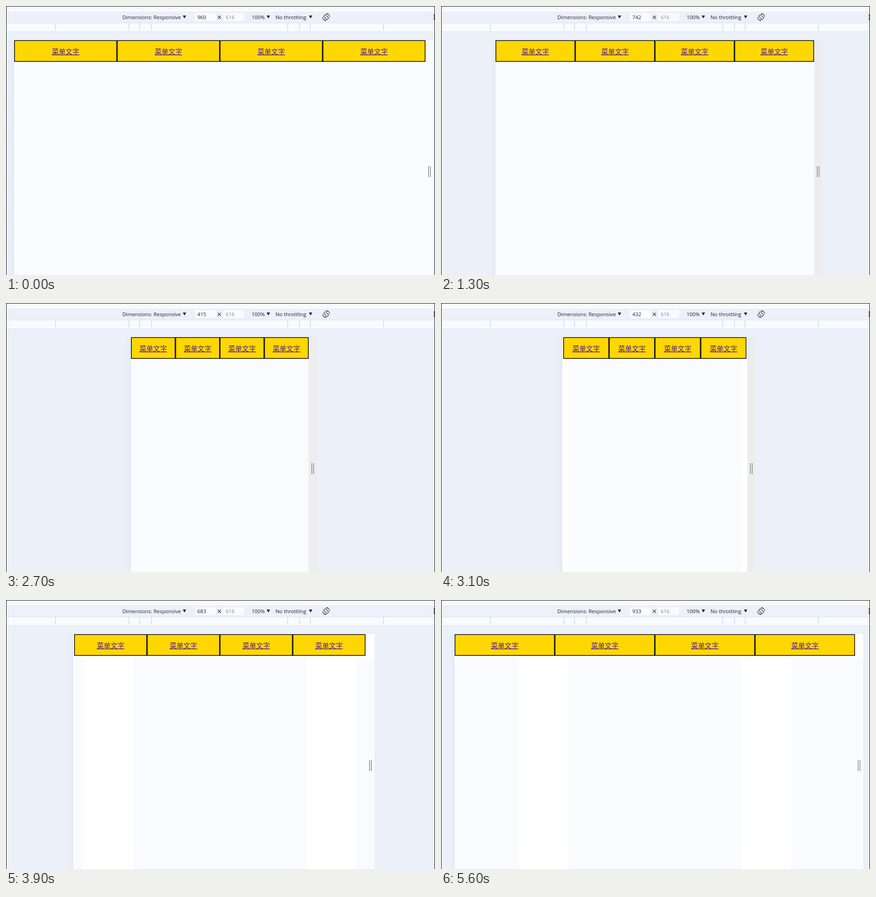
Recreate the animation shown at these times as an HTML page. Size 944 px wide and 593 px high, loop 5700 ms.

```html
<!DOCTYPE html>
<html lang="zh-CN">
<head>
<meta charset="utf-8">
<style>
  html, body { margin: 0; width: 100%; height: 100%; overflow: hidden; background: #ecf0f9; }
  svg { display: block; }
  .ui { font: 11.4px "Open Sans", "Noto Sans", sans-serif; fill: #202124; }
  .menu rect { fill: #ffd700; stroke: #000; stroke-width: 1.5; }
  .menu text {
    font: 300 15.1px "Noto Sans CJK SC", "Noto Sans CJK", sans-serif;
    fill: #551a8b; text-anchor: middle; text-decoration: underline;
  }
</style>
</head>
<body>
<svg width="944" height="593" viewBox="0 0 944 593">
  <defs>
    <linearGradient id="shade">
      <stop offset="0" stop-color="#d5deeb" stop-opacity="0"/>
      <stop offset="1" stop-color="#d5deeb" stop-opacity=".35"/>
    </linearGradient>
  </defs>
  <rect width="944" height="593" fill="#ecf0f9"/>
  <rect y="1" width="944" height="11" fill="#f9fbfe"/>
  <rect y="37" width="944" height="20" fill="#d5e4fb"/>
  <rect y="38" width="944" height="18" fill="#f9fbfe"/>
  <g id="ticks" fill="#c8dcfb"></g>

  <g class="ui">
    <rect x="416" y="16" width="46" height="17" rx="2" fill="#f9fbfe"/>
    <rect x="478" y="16" width="46" height="17" rx="2" fill="#f9fbfe"/>
    <text x="256" y="28.5">Dimensions: Responsive</text>
    <text id="size" x="421" y="28.5"></text>
    <text x="483.5" y="28.5" fill="#80868b">616</text>
    <text x="540.5" y="28.5">100%</text>
    <text x="593" y="28.5">No throttling</text>
    <path d="M389 21h7.5l-3.75 6.5zM573.5 21h7.5l-3.75 6.5zM666.5 21h7.5l-3.75 6.5z"/>
    <path d="M466 21.5l7 7m0-7l-7 7" stroke="#333" stroke-width="1.1"/>
    <g fill="none" stroke="#333" stroke-width="1.2" transform="translate(704.5 24.5)">
      <rect x="-2.7" y="-5.5" width="5.4" height="11" rx="1" transform="rotate(-45)"/>
      <path d="M0-7.8A7.8 7.8 0 0 1 7.8 0M0 7.8A7.8 7.8 0 0 1-7.8 0M0-7.8l2.5 2.5M0 7.8l-2.5-2.5"/>
    </g>
    <path d="M941 19h2v2h-2zM941 23.5h2v2h-2zM941 28h2v2h-2z"/>
  </g>

  <rect id="shadow" y="75" width="14" height="518" fill="url(#shade)"/>
  <rect id="gutter" y="75" width="18" height="518"/>
  <rect id="page" y="75" height="518"/>
  <rect id="strip" y="75" height="52" fill="#fff"/>
  <rect id="band" x="170" y="123" width="600" height="470" fill="#fff"/>
  <rect id="core" x="280" y="127" width="380" height="466" fill="#f9fbfe"/>
  <g id="menu" class="menu"></g>
  <path id="handle" d="M6 353h1.7v24h-1.7zM10 353h1.7v24h-1.7z" fill="#949494"/>
  <path d="M.5 593V.5H943.5V593" fill="none" stroke="#000"/>
</svg>
<script>
const LOOP = 5700, STEP = 100, SCALE = 0.9434, CENTER = 470.5;
const LIGHT = '#f9fbfe', GREY = '#ededef';

// the drag: [time, viewport width]
const DRAG = [
  [0, 960], [600, 960], [1300, 742], [2100, 472], [2500, 426], [2600, 426], [2800, 404],
  [2900, 404], [3100, 432], [3500, 526], [4400, 880], [4800, 930], [LOOP, 933]
];

const $ = id => document.getElementById(id);
const set = (el, attrs) => { for (const k in attrs) el.setAttribute(k, attrs[k]); };
const show = (id, on) => set($(id), { visibility: on ? 'visible' : 'hidden' });

function add(parent, tag, attrs) {
  const el = document.createElementNS('http://www.w3.org/2000/svg', tag);
  set(el, attrs);
  return parent.appendChild(el);
}

for (const d of [150, 176, 199.5, 361])
  for (const x of [CENTER - d, CENTER + d])
    add($('ticks'), 'rect', { x: x - 1.5, y: 38, width: 1.6, height: 16 });

const items = [0, 1, 2, 3].map(() => {
  const box = add($('menu'), 'rect', { y: 76.25, height: 46 });
  const label = add($('menu'), 'text', { y: 106 });
  label.textContent = '菜单文字';
  return { box, label };
});

function widthAt(t) {
  const i = DRAG.findIndex(k => k[0] > t);
  const [t0, w0] = DRAG[i - 1], [t1, w1] = DRAG[i];
  return Math.round(w0 + (w1 - w0) * (t - t0) / (t1 - t0));
}

const leftEdge = w => Math.round(CENTER - w * SCALE / 2 - 0.1);

function draw(t) {
  const size = widthAt(t), growing = size - widthAt(Math.max(0, t - STEP)) > 2;
  const left = leftEdge(size), right = 2 * CENTER - left;
  const white = t >= 3000 && t < 3900, late = t >= 3900;

  $('size').textContent = size;
  set($('shadow'), { x: left - 14 });
  set($('page'), { x: left, width: right - left, fill: white ? '#fff' : LIGHT });
  set($('gutter'), { x: right, fill: t < 700 || late ? LIGHT : GREY });
  set($('strip'), { x: left, width: right - left + 18 });
  set($('handle'), { transform: `translate(${right} 0)` });
  show('strip', late);
  show('band', late);
  show('core', t >= 3000);

  // the page content trails the frame while it grows
  const start = leftEdge(size - (growing ? 4 : 0)), w = (CENTER - start) / 2;
  items.forEach(({ box, label }, i) => {
    const x = start + i * w;
    set(box, { x: x + 0.75, width: w - 1.5 });
    set(label, { x: x + w / 2 });
  });
}

const begin = performance.now();
function tick() {
  const t = (performance.now() - begin) % LOOP;
  draw(Math.floor(t / STEP) * STEP);
  requestAnimationFrame(tick);
}
tick();
</script>
</body>
</html>
```
